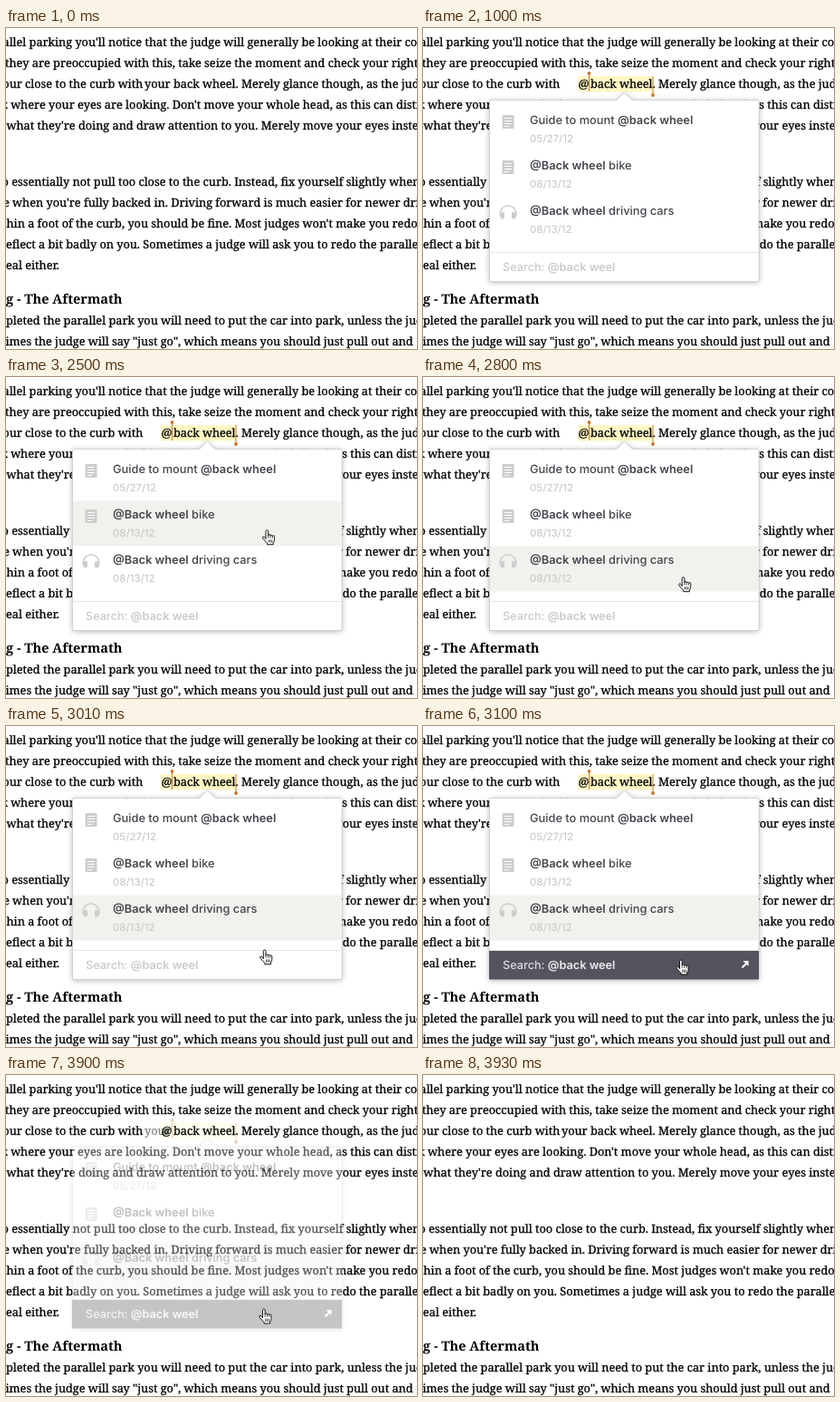
Recreate the animation shown at these times as an HTML page. Size 454 by 354 pixels, loop 4.9 s.

```html
<!DOCTYPE html>
<html lang="en">
<head>
<meta charset="utf-8">
<title>Inline search popup</title>
<style>
  html, body { margin: 0; width: 100%; height: 100%; overflow: hidden; background: #fff; }
  svg { display: block; width: 454px; height: 354px; overflow: hidden; }
  text { text-rendering: geometricPrecision; white-space: pre; }
  .body { font: 12.73px "Noto Serif", Georgia, serif; fill: #000; stroke: #000; stroke-width: .3px; }
  .heading { font-size: 14.5px; font-weight: 700; stroke: none; }
  .title { font: 500 12.8px Inter, sans-serif; fill: #45444c; }
  .strong { font-weight: 600; }
  .date { font: 500 11.4px Inter, sans-serif; fill: #cbcbcb; }
  .search { font: 500 12.7px Inter, sans-serif; fill: #cacaca; }
  .active .search { fill: #dcdce0; }
  .active .strong { fill: #ececee; }
  .panel { filter: drop-shadow(0 1px 3px rgba(0, 0, 0, .3)); }
</style>
</head>
<body>
<svg viewBox="0 0 454 354">
  <defs>
    <g id="note">
      <rect x="87.5" y="-10" width="13" height="15" rx="1" fill="#cdcdcd"/>
      <path d="M90 -6.5h8M90 -3.5h8M90 -.5h8M90 2.5h5" stroke="#fff"/>
    </g>
    <g id="phones" fill="#cdcdcd">
      <path d="M85.2 0C84.5 -13.5 103.5 -13.5 102.8 0" fill="none" stroke="#cdcdcd" stroke-width="1.5"/>
      <rect x="86" y="-3" width="4" height="7.5" rx="1.5"/>
      <rect x="98" y="-3" width="4" height="7.5" rx="1.5"/>
      <path d="M84.3 -1h2v4h-1zM103.7 -1h-2v4h1z"/>
    </g>
    <path id="bubble" d="M75 79.5H214L222.5 71L231 79.5H369.5Q371 79.5 371 81V279.5H73.5V81Q73.5 79.5 75 79.5Z"/>
  </defs>

  <rect id="marker" x="171" y="53" width="83" height="17.5" fill="#fff8c5"/>
  <g id="article" class="body"></g>
  <text id="at" class="body" x="171.5" y="66">@</text>

  <g id="overlay">
    <g fill="#c67a2c">
      <path d="M183 50h1v20h-1zM253.5 53h1v21h-1z"/>
      <circle cx="183.5" cy="50" r="1.9"/>
      <circle cx="254" cy="74" r="1.9"/>
    </g>
    <use href="#bubble" class="panel" fill="#fff"/>
    <use href="#bubble" fill="none" stroke="#c9c9c9" stroke-width=".7"/>
    <rect id="hover" x="74" width="296.5" height="50" fill="#f1f1ed"/>
    <g id="results"></g>
    <g id="footer">
      <path d="M74 247.5H370.5" stroke="#e4e4e4"/>
      <g id="dark">
        <rect x="73" y="248" width="298" height="31.5" fill="#54535e"/>
        <path d="M352.5 266.5L357 262" stroke="#fff" stroke-width="2"/>
        <path d="M353.5 259H359.5V265Z" fill="#fff"/>
      </g>
      <text class="search" x="88" y="268">Search: <tspan class="strong">@back weel</tspan></text>
    </g>
  </g>
  <g id="hand" stroke="#111" stroke-linejoin="round" stroke-linecap="round">
    <path fill="#fff" d="M4.5 10V2a1.35 1.35 0 0 1 2.7 0V6.5a1.2 1.2 0 0 1 2.4 .3a1.2 1.2 0 0 1 2.3 .5a1.1 1.1 0 0 1 2.1 .7V11q0 2-1.3 3.5V16.5H6V15Q4 13 1.2 9.7Q.4 8.2 1.6 7.6Q2.8 7.4 4.5 10Z"/>
    <path fill="none" stroke-width=".8" d="M7.2 6.5V9M9.6 7V9M11.9 7.5V9M7.7 11.5v2.5M9.5 11.5v2.5M11.3 11.5v2.5"/>
  </g>
</svg>
<script>
const $ = id => document.getElementById(id);

// Left edge, baseline, text
const lines = [
  [-3.5, 20, "allel parking you'll notice that the judge will generally be looking at their contr"],
  [-1, 43, "they are preoccupied with this, take seize the moment and check your right"],
  [-3.7, 66, `our close to the curb with <tspan id="your" x="153">your</tspan><tspan x="185">back wheel. Merely glance though, as the judge</tspan>`],
  [-5.6, 89, "k where your eyes are looking. Don't move your whole head, as this can distract"],
  [0.5, 112, "what they're doing and draw attention to you. Merely move your eyes instead"],
  [-4.5, 174, "o essentially not pull too close to the curb. Instead, fix yourself slightly when"],
  [-3, 197, "e when you're fully backed in. Driving forward is much easier for newer drivers"],
  [0.5, 220, "hin a foot of the curb, you should be fine. Most judges won't make you redo"],
  [0, 243, "eflect a bit badly on you. Sometimes a judge will ask you to redo the parallel"],
  [0, 266, "eal either."],
  [0, 304, "g - The Aftermath", "heading"],
  [0, 327, "pleted the parallel park you will need to put the car into park, unless the judge"],
  [-0.5, 350, 'imes the judge will say "just go", which means you should just pull out and']
];
$("article").innerHTML = lines.map(([x, y, text, cls = ""]) =>
  `<text class="${cls}" x="${x}" y="${y}">${text}</text>`).join("");

const strong = text => `<tspan class="strong">${text}</tspan>`;
const results = [
  ["note", "Guide to mount " + strong("@back wheel"), "05/27/12"],
  ["note", strong("@Back wheel") + " bike", "08/13/12"],
  ["phones", strong("@Back wheel") + " driving cars", "08/13/12"]
];
$("results").innerHTML = results.map(([icon, title, date], i) => `
  <g transform="translate(0 ${106 + 50 * i})">
    <use href="#${icon}"/>
    <text class="title" x="118">${title}</text>
    <text class="date" x="118" y="19.5">${date}</text>
  </g>`).join("");

const LOOP = 4900, OPEN = 1000, MOVE = 2200, CLOSE = 3870, STEP = 30;
const show = (id, on) => $(id).setAttribute("visibility", on ? "inherit" : "hidden");

function opacityAt(t) {
  if (t < OPEN) return 0;
  if (t < CLOSE) return 1;
  return Math.max(0, 1 - (Math.floor((t - CLOSE) / STEP) + 1) / 3);
}

// Down the list in 17 steps, then on to the footer in 13
function handAt(t) {
  const step = Math.min(30, Math.max(0, Math.floor((t - MOVE) / STEP)));
  const toList = Math.min(1, step / 17), toFooter = Math.max(0, (step - 17) / 13);
  return [282.5 - 3.5 * toFooter, 110 + 99 * toList + 48.5 * toFooter];
}

function draw(now) {
  const t = now % LOOP, opacity = opacityAt(t), moving = t >= MOVE;
  const [x, y] = handAt(t), inFooter = moving && y > 247;
  $("overlay").setAttribute("opacity", opacity);
  $("marker").setAttribute("opacity", opacity);
  $("your").setAttribute("opacity", 1 - opacity);
  $("your").setAttribute("fill-opacity", 1 - opacity);
  $("your").setAttribute("stroke-opacity", 1 - opacity);
  show("at", opacity > 0);
  show("hand", moving && opacity > 0);
  show("hover", moving);
  show("dark", inFooter);
  $("footer").setAttribute("class", inFooter ? "active" : "");
  $("hand").setAttribute("transform", `translate(${x} ${y})`);
  $("hover").setAttribute("y", 86.5 + 50 * Math.min(2, Math.floor((y - 86.5) / 50)));
}

const start = performance.now();
function tick() {
  draw(performance.now() - start);
  requestAnimationFrame(tick);
}
tick();
</script>
</body>
</html>
```
